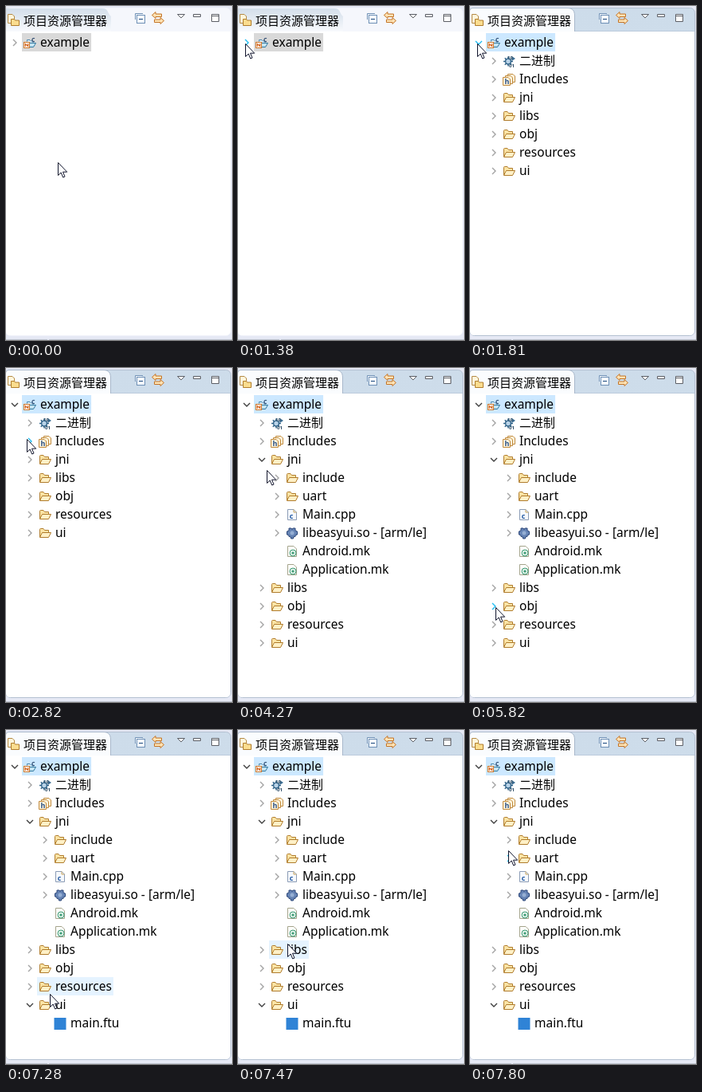
An HTML page for the animation above (8 s loop, 284 px wide and 419 px high).

```html
<!DOCTYPE html>
<html lang="zh-CN">
<head>
<meta charset="utf-8">
<style>
html, body { margin: 0; width: 284px; height: 419px; overflow: hidden; background: #e6e9f5; }
svg { display: block; }
text { font: 15.5px "Noto Sans", "Noto Sans CJK SC", "Noto Sans CJK", sans-serif; white-space: pre; }
.cjk { font-size: 15px; }
.small { font: bold 7px "Noto Sans", sans-serif; }
</style>
</head>
<body>
<svg width="284" height="419" fill="none">
  <defs>
    <linearGradient id="tabOff" x2="0" y2="1"><stop stop-color="#d3deea"/><stop offset="1" stop-color="#f8fafd"/></linearGradient>
    <linearGradient id="barOn" x2="0" y2="1"><stop stop-color="#cddcea"/><stop offset="1" stop-color="#d3e2f0"/></linearGradient>
    <g id="folder" stroke="#b07c2c">
      <path d="M1.5 13V3.5Q1.5 2.5 2.5 2.5H6L7.5 4.5H12.5V8" fill="#fbe3a4"/>
      <path d="M1.5 13.5 4.5 7.5H15.5L12.5 13.5Z" fill="#fff0c6"/>
    </g>
    <g id="project">
      <path d="M4.5 6.5V4.5H8L9.5 6H12V8" fill="#d9ecf8" stroke="#4b87ad"/>
      <path d="M4.5 13.5 7 8.5H15.5L12.5 13.5Z" fill="#c3e4f2" stroke="#32789f"/>
      <rect x=".5" y="7.5" width="7" height="7" fill="#fff" stroke="#d07a2c"/>
      <path d="M2.3 13V9.5L5.7 12.5V9" stroke="#d2601a" stroke-width="1.2"/>
      <text class="small" x="10" y="6.5" fill="#1f3d66">C</text>
    </g>
    <g id="binary">
      <circle cx="7" cy="8.5" r="3.4" fill="#b9d3e8" stroke="#2f6288" stroke-width="1.4"/>
      <path d="M7 2.5V5M7 12V14.5M1 8.5H3.5M10.5 8.5H13M2.8 4.3 4.5 6M9.5 11 11.2 12.7M2.8 12.7 4.5 11" stroke="#2f6288" stroke-width="1.5"/>
      <path d="M11.5 2 16 5 11.5 8Z" fill="#3d6f94"/>
      <text class="small" x="6" y="5.5" style="font-size:6px" fill="#24445f">10</text>
      <text class="small" x="8" y="15.5" style="font-size:6px" fill="#24445f">01</text>
    </g>
    <g id="includes" fill="#fff4dc" stroke="#c08a3e">
      <path d="M6.5 1.5H13L15.5 4V11.5H6.5Z"/><path d="M3.5 3.5H10L12.5 6V13.5H3.5Z"/><path d="M.5 5.5H7L9.5 8V15.5H.5Z"/>
      <text class="small" x="2.6" y="14.2" style="font-size:9px" fill="#274f86" stroke="none">h</text>
    </g>
    <g id="source">
      <path d="M2.5 1.5H10L13.5 5V14.5H2.5Z" fill="#f6f9fd" stroke="#8a9bb5"/><path d="M10 1.5V5H13.5" stroke="#c7a35a"/>
      <text class="small" x="4.7" y="12.8" style="font-size:9px" fill="#1e56a0">c</text>
    </g>
    <g id="library">
      <path d="M4 2H7L8 3.5 9 2H12V5L14.5 6V10L12 11V12.5L9.5 13V15H6.5V13L4 12.5V11L1.5 10V6L4 5Z" fill="#6684b5" stroke="#2c4778"/>
      <circle cx="8" cy="8" r="2.5" fill="#96afd3"/>
    </g>
    <g id="makefile">
      <path d="M2.5 1.5H10L13.5 5V14.5H2.5Z" fill="#fdfdfa" stroke="#a5a48c"/>
      <circle cx="9" cy="10" r="4" fill="#e2f3ea" stroke="#3d9a75"/><circle cx="9" cy="10" r="1.6" fill="#3d9a75"/>
    </g>
    <rect id="ui" width="15" height="15" y="1" x=".5" fill="#2f83d6"/>
  </defs>

  <path d="M0 418.5H52M54 418.5H284" stroke="#bfc5d0"/>
  <g id="off">
    <rect x="-.5" y="2.5" width="283" height="411" rx="6" fill="#f5f7fc" stroke="#f1f3fa"/>
    <path d="M0 3H121C129 3 127 9 132 13V32H0Z" fill="url(#tabOff)"/>
  </g>
  <g id="on">
    <rect x="-.5" y="2.5" width="283" height="411" rx="6" fill="url(#barOn)" stroke="#b4c0d1"/>
    <path d="M132 31.5H282" stroke="#bccbdc"/>
    <path d="M-.5 32V7Q-.5 2.5 4 2.5H122C129 2.5 131.5 6 131.5 12V32" fill="#fafcfe" stroke="#a9b8cb"/>
  </g>
  <path d="M0 32H282V407Q282 413 276 413H5Q0 413 0 408Z" fill="#fff"/>

  <g transform="translate(1 9)">
    <path d="M1.5 1.5H7L9.5 4V12.5H1.5Z" fill="#fff6dc" stroke="#b48a45"/>
    <path d="M5.5 15.5V7.5H9.5L10.5 9H15.5V15.5Z" fill="#fbdd8f" stroke="#b07c2c"/>
  </g>
  <text class="cjk" x="22" y="24" fill="#000">项目资源管理器</text>
  <g stroke="#6f90b5" fill="#f4f9ff">
    <path d="M162.5 17V9.5H172"/><rect x="164.5" y="11.5" width="10" height="10"/>
    <path d="M167 16.5H172" stroke="#1f4a7c"/>
  </g>
  <g stroke="#c47427" fill="#fde3b5">
    <path d="M183.5 11.5 188 7.5V10H195.5V13.5H188V15.5Z"/>
    <path d="M198.500 18.500 194 14.500V17H186.500V20.500H194V22.500Z"/>
  </g>
  <g stroke="#5c5f66" fill="#fff">
    <path d="M215.500 10.500H224.500L220 15Z"/><path d="M235.500 10.500H244.500V13.500H235.500Z"/>
    <path d="M258.500 10.500H267.500V19.500H258.500ZM258.500 12.500H267.500"/>
  </g>

  <g id="tree"></g>
  <path id="cursor" d="M.5.5V16.500L4.200 13 6.700 19 9 18 6.500 12.200H11.700Z" fill="#fff" stroke="#10142c"/>
</svg>
<script>
const LOOP = 8000, FOCUS = 1740, ROOT = 1810, JNI = 3720, UI = 6580, NEVER = Infinity;
const ROW = 23, INDENT = 19;

// level, icon, label, time shown, time opened (absent for leaves)
const items = [
  [0, 'project', 'example', 0, ROOT],
  [1, 'binary', '二进制', ROOT, NEVER],
  [1, 'includes', 'Includes', ROOT, NEVER],
  [1, 'folder', 'jni', ROOT, JNI],
  [2, 'folder', 'include', JNI, NEVER],
  [2, 'folder', 'uart', JNI, NEVER],
  [2, 'source', 'Main.cpp', JNI, NEVER],
  [2, 'library', 'libeasyui.so - [arm/le]', JNI, NEVER],
  [2, 'makefile', 'Android.mk', JNI],
  [2, 'makefile', 'Application.mk', JNI],
  [1, 'folder', 'libs', ROOT, NEVER],
  [1, 'folder', 'obj', ROOT, NEVER],
  [1, 'folder', 'resources', ROOT, NEVER],
  [1, 'folder', 'ui', ROOT, UI],
  [2, 'ui', 'main.ftu', UI]
];

// arrival time, x, y, number of steps on the way (1 = hold, then jump)
const path = [
  [0, 65, 196], [290, 65, 196], [1130, 14, 53, 12], [1250, 11, 49], [1380, 9, 47],
  [2424, 9, 47], [2820, 26, 89, 6], [2980, 43, 98, 2], [3220, 30, 113, 3],
  [4270, 36, 128], [4595, 62, 182, 5], [5050, 31, 267, 7],
  [5400, 46, 313, 5], [5820, 32, 300, 6],
  [5887, 32, 300], [6330, 30, 345, 7],
  [7070, 30, 345], [7280, 55, 331, 3], [7540, 68, 205, 4], [7800, 48, 151, 4]
];

const $ = id => document.getElementById(id);
const pen = document.createElement('canvas').getContext('2d');
const isCjk = s => s > '\u3000';

function textWidth(s) {
  pen.font = (isCjk(s) ? 15 : 15.5) + 'px "Noto Sans", "Noto Sans CJK SC", "Noto Sans CJK", sans-serif';
  return pen.measureText(s).width;
}

function pointer(t) {
  const next = path.findIndex(p => p[0] > t);
  if (next < 0) return path[path.length - 1].slice(1, 3);
  const [ta, xa, ya] = path[next - 1], [tb, xb, yb, n = 1] = path[next];
  const k = Math.floor((t - ta) / (tb - ta) * n + 1e-6) / n;
  return [Math.round(xa + (xb - xa) * k), Math.round(ya + (yb - ya) * k)];
}

function row([level, icon, label, , opens], i, t, [px, py]) {
  const y = 46 + i * ROW, dx = level * INDENT, right = 43 + dx + textWidth(label) + 2;
  const inRow = py >= y - 12 && py < y + 11;
  const onArrow = inRow && Math.abs(px - 11 - dx) <= 8;
  const onLabel = inRow && px >= 20 + dx && px < right;
  const back = i == 0 ? (t < FOCUS ? '#d9d9d9' : '#cce8ff') : onLabel ? '#e5f3ff' : '';
  const open = t >= opens;
  const color = onArrow ? '#22bdf2' : open ? '#404040' : '#a3a3a3';
  const chevron = open ? 'M7 44l4 4 4-4' : 'M9 42l4 4-4 4';
  return (back ? `<rect x="${20 + dx}" y="${y - 12}" width="${right - 20 - dx}" height="${ROW}" fill="${back}"/>` : '') +
    (opens ? `<path transform="translate(${dx} ${y - 46})" d="${chevron}" stroke="${color}" stroke-width="1.4"/>` : '') +
    `<use href="#${icon}" x="${22 + dx}" y="${y - 8}"/>` +
    `<text ${isCjk(label) ? 'class="cjk"' : ''} x="${43 + dx}" y="${y + 5}" fill="#000">${label}</text>`;
}

let last = '';
function draw(now) {
  const t = now % LOOP, at = pointer(t);
  const html = items.filter(it => t >= it[3]).map((it, i) => row(it, i, t, at)).join('');
  if (html != last) $('tree').innerHTML = last = html;
  $('on').style.display = t < FOCUS ? 'none' : '';
  $('off').style.display = t < FOCUS ? '' : 'none';
  $('cursor').setAttribute('transform', `translate(${at})`);
  requestAnimationFrame(draw);
}

const start = performance.now();
const clock = () => performance.now() - start;
(function tick() {
  const frame = requestAnimationFrame;
  draw = (body => () => body(clock()))(draw);
  frame(draw);
})();
</script>
</body>
</html>
```
